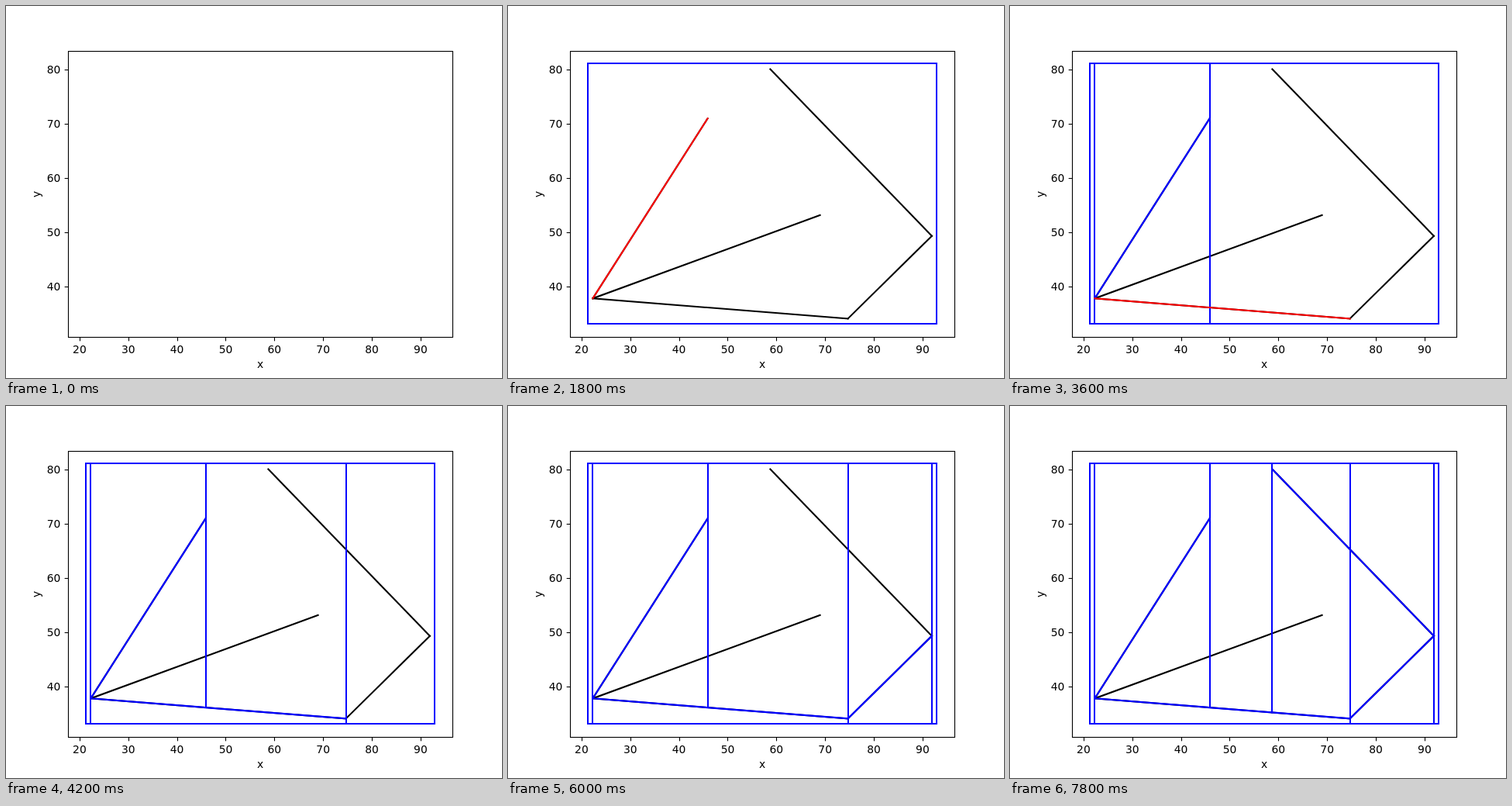
Recreate the animation shown at these times as an HTML page. Size 640 by 480 pixels, loop 8 s.

```html
<!DOCTYPE html>
<html lang="en">
<head>
<meta charset="utf-8">
<title>Trapezoidal map</title>
<style>
html, body { margin: 0; width: 100%; height: 100%; overflow: hidden; background: #fff; }
svg { display: block; width: 640px; height: 480px; }
text { font: 13.889px "DejaVu Sans", sans-serif; fill: #000; text-anchor: middle; }
</style>
</head>
<body>
<svg id="stage" viewBox="0 0 640 480"></svg>
<script>
const LOOP = 8000, STEP = 600;
const stage = document.getElementById("stage");
const items = [];

function add(tag, attrs, text) {
  const el = document.createElementNS("http://www.w3.org/2000/svg", tag);
  for (const key in attrs) el.setAttribute(key, attrs[key]);
  if (text !== undefined) el.textContent = text;
  stage.appendChild(el);
  return el;
}

// Visible from step "from" up to, but not including, step "to".
function during(el, from, to = Infinity) {
  items.push({ el, from, to });
}

function line(p, q, color, width = 2.08) {
  return add("line", {
    x1: p[0], y1: p[1], x2: q[0], y2: q[1],
    stroke: color, "stroke-width": width, "stroke-linecap": "square"
  });
}

function drawAxes() {
  const thin = { fill: "none", stroke: "#000", "stroke-width": 1.11 };
  for (let i = 0; i < 8; i++) {
    const x = 94.9 + i * 62.86;
    add("path", { d: `M${Math.round(x) + 0.5} 427.5v4.86`, ...thin });
    add("text", { x, y: 448 }, 20 + i * 10);
  }
  for (let i = 0; i < 5; i++) {
    const y = 362 - i * 70;
    add("path", { d: `M80.5 ${y + 0.5}h-4.86`, ...thin });
    add("text", { x: 70.3, y: y + 5, style: "text-anchor:end" }, 40 + i * 10);
  }
  add("rect", { x: 80.5, y: 58.5, width: 496, height: 369, ...thin });
  add("text", { x: 328, y: 467 }, "x");
  add("text", { transform: "translate(44 243) rotate(-90)" }, "y");
}

const left = 103, right = 553, top_ = 74, bottom = 410;
const a = [109.4, 377.3], b = [257.6, 145.1], c = [438.6, 403.4];
const d = [546.9, 296.7], e = [338.4, 81.5], f = [402.6, 269.8];

// Segments in order of insertion, with the step at which each is picked.
const segments = [
  { p: a, q: b, pick: 3 },
  { p: a, q: c, pick: 6 },
  { p: c, q: d, pick: 9 },
  { p: e, q: d, pick: 12 },
  { p: a, q: f, pick: Infinity }
];

const floorAt = x => a[1] + (c[1] - a[1]) * (x - a[0]) / (c[0] - a[0]);

function wall(x, from, to, end = bottom) {
  x = Math.round(x);
  during(line([x, top_], [x, end], "#00f", 2), from, to);
}

drawAxes();
for (const s of segments) during(line(s.p, s.q, "#000"), 1);

during(add("rect", {
  x: left, y: top_, width: right - left, height: bottom - top_,
  fill: "none", stroke: "#00f", "stroke-width": 2
}), 2);

wall(a[0], 4);
wall(b[0], 4, 7);
wall(b[0], 7, Infinity, floorAt(b[0]));
wall(c[0], 7);
wall(d[0], 10);
wall(e[0], 13, Infinity, floorAt(e[0]));

for (const s of segments) {
  if (s.pick === Infinity) continue;
  during(line(s.p, s.q, "#00f", 2.25), s.pick + 1);
  during(line(s.p, s.q, "#f00"), s.pick, s.pick + 1);
}

function render(ms) {
  const step = Math.floor((ms % LOOP) / STEP);
  for (const { el, from, to } of items) {
    el.style.display = step >= from && step < to ? "" : "none";
  }
}

let start;
function tick(now) {
  if (start === undefined) start = now;
  render(Math.max(0, now - start));
  requestAnimationFrame(tick);
}
render(0);
requestAnimationFrame(tick);
</script>
</body>
</html>
```
